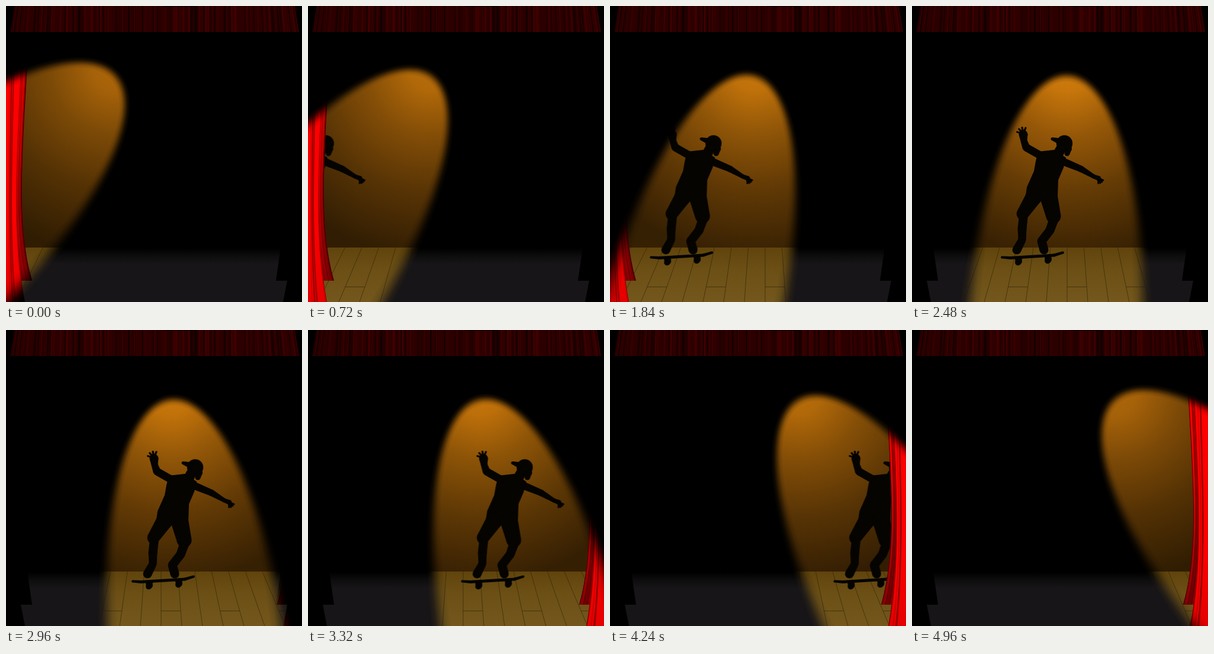
An HTML page with a canvas for the animation above (5000 ms loop, 500x500 px).

```html
<!DOCTYPE html>
<html lang="en">
<head>
<meta charset="utf-8">
<title>Skater in the spotlight</title>
<style>
html, body { margin: 0; width: 100%; height: 100%; overflow: hidden; background: #000; }
canvas { display: block; width: 500px; height: 500px; }
</style>
</head>
<body>
<canvas id="stage" width="500" height="500"></canvas>
<script>
const SIZE = 500, LOOP = 5000, STEP = 40, HORIZON = 408;

let seed = 7;
function rnd() {
  seed = (seed * 16807) % 2147483647;
  return seed / 2147483647;
}

function layer(draw) {
  const c = document.createElement('canvas');
  c.width = c.height = SIZE;
  if (draw) draw(c.getContext('2d'));
  return c;
}

function ramp(g, stops) {
  stops.forEach(([at, color]) => g.addColorStop(at, color));
  return g;
}

function polygon(c, points) {
  c.beginPath();
  points.forEach(([x, y]) => c.lineTo(x, y));
  c.fill();
}

// Chain of tapered capsules through joints [x, y, radius]
function limb(c, ...joints) {
  joints.forEach(([x, y, r], i) => {
    c.beginPath();
    c.arc(x, y, r, 0, 2 * Math.PI);
    c.fill();
    if (!i) return;
    const [px, py, pr] = joints[i - 1];
    const d = Math.hypot(x - px, y - py), nx = (py - y) / d, ny = (x - px) / d;
    polygon(c, [[px + nx * pr, py + ny * pr], [x + nx * r, y + ny * r],
      [x - nx * r, y - ny * r], [px - nx * pr, py - ny * pr]]);
  });
}

function fingers(c, x, y, from, spread, length) {
  for (let i = 0; i < 4; i++) {
    const a = from + spread * i;
    limb(c, [x, y, 2], [x + length * Math.cos(a), y + length * Math.sin(a), 1.5]);
  }
}

const valance = layer(c => {
  const flare = (f, y) => 14 + 474 * f + 7 * (2 * f - 1) ** 5 * y / 44;
  const strand = f => {
    c.moveTo(flare(f, 0), 0);
    c.lineTo(flare(f, 44), 44);
  };
  c.beginPath();
  strand(0);
  c.lineTo(flare(1, 44), 44);
  c.lineTo(flare(1, 0), 0);
  c.clip();
  c.fillStyle = '#2c0000';
  c.fillRect(0, 0, SIZE, 45);
  for (let i = 0; i < 200; i++) {
    c.strokeStyle = rnd() < 0.6 ? `rgba(8,0,0,${0.2 + rnd() * 0.4})` : `rgba(76,0,2,${0.2 + rnd() * 0.4})`;
    c.lineWidth = 1 + rnd() * 2;
    c.beginPath();
    strand(rnd());
    c.stroke();
  }
  c.fillStyle = '#000';
  c.fillRect(265, 0, 55, 1);
});

const dimFloor = layer(c => {
  c.fillStyle = ramp(c.createLinearGradient(0, 409, 0, 436),
    [[0, '#000'], [0.5, '#0e0d0e'], [1, '#171517']]);
  const side = [[36, HORIZON], [44, 464], [25, 464], [32, SIZE]];
  polygon(c, [...side, ...side.map(([x, y]) => [500 - x, y]).reverse()]);
});

const floor = layer(c => {
  c.fillStyle = ramp(c.createLinearGradient(0, HORIZON, 0, SIZE),
    [[0, '#60440c'], [0.4, '#6b4f15'], [1, '#73571c']]);
  c.fillRect(0, HORIZON, SIZE, SIZE - HORIZON);
  c.strokeStyle = 'rgba(48,32,6,.6)';
  const seam = (k, y) => 262 + k * (28.5 + 6.5 * (y - HORIZON) / 92);
  c.beginPath();
  for (let k = -10; k <= 9; k++) {
    c.moveTo(seam(k, HORIZON), HORIZON);
    c.lineTo(seam(k, SIZE), SIZE);
    if ((k + 10) % 3 === 0) {
      c.moveTo(seam(k + 1, 474.5), 474.5);
      c.lineTo(seam(k + 2, 474.5), 474.5);
    }
  }
  c.stroke();
});

const backFold = (c, f) => c.bezierCurveTo(f * 28, 250, f * 17, 370, f * 44, 464);
const frontFold = (c, f) => c.bezierCurveTo(f * 20, 250, f * 10, 380, f * 32, SIZE);

function panel(c, { top, bottom, fold, colors, strands, shade }) {
  c.save();
  c.beginPath();
  c.moveTo(-2, 100);
  c.lineTo(top, 100);
  fold(c, 1);
  c.lineTo(-2, bottom);
  c.clip();
  c.fillStyle = ramp(c.createLinearGradient(0, 100, 0, bottom), colors);
  c.fillRect(-2, 90, 60, 420);
  for (let i = 0; i < strands; i++) {
    const f = 1 - 0.9 * rnd() ** 1.6;
    c.strokeStyle = `rgba(60,0,2,${shade * (0.3 + rnd() * 0.7)})`;
    c.lineWidth = 0.6 + rnd();
    c.beginPath();
    c.moveTo(top * f, 100);
    fold(c, f);
    c.stroke();
  }
  c.restore();
}

function curtain(c) {
  panel(c, {
    top: 36, bottom: 464, fold: backFold, strands: 20, shade: 0.7,
    colors: [[0, '#f00'], [0.4, '#e40000'], [1, '#860004']]
  });
  panel(c, {
    top: 27, bottom: SIZE, fold: frontFold, strands: 10, shade: 0.5,
    colors: [[0, '#f00'], [0.7, '#fc0000'], [1, '#e40000']]
  });
}

const curtains = layer(c => {
  curtain(c);
  c.translate(502, 0);
  c.scale(-1, 1);
  curtain(c);
});

// Drawn around its mid-loop pose, shifted left to start at x = 70
const skater = layer(c => {
  c.translate(-80, 0);
  c.fillStyle = '#050401';
  // head, cap and neck
  limb(c, [257.5, 232, 13.7]);
  limb(c, [248, 228, 5], [237, 224.5, 2.5]);
  limb(c, [266, 241, 4], [262, 249, 4.5]);
  limb(c, [251, 242, 8.5], [245, 253, 9]);
  // torso
  polygon(c, [[213, 246], [240, 243], [260, 256], [256, 273], [247, 294],
    [246, 322], [192, 320], [194, 306], [206, 279], [209, 262]]);
  // arms
  limb(c, [216, 252, 6.5], [193, 239, 6.5], [189, 228, 5.5], [188, 217, 7.5]);
  fingers(c, 188, 216, -2.85, 0.55, 11);
  limb(c, [256, 263, 6.5], [285, 275, 5.5], [307, 288, 3.5], [315, 291, 4]);
  fingers(c, 315, 291, 0.4, 0.4, 8.5);
  // legs
  limb(c, [206, 322, 14], [187, 351, 10.5]);
  limb(c, [188, 358, 7.5], [186, 376, 7.5], [186, 395, 6.5], [177, 412, 7.5]);
  limb(c, [231, 322, 15], [239, 355, 12.5]);
  limb(c, [239, 362, 8], [233, 379, 7.5], [219, 397, 7.5], [223, 412, 7.5]);
  // board
  limb(c, [152, 424.5, 2], [166, 425.5, 2.5], [240, 421, 2.5], [255, 416.5, 2]);
  for (const [x, y] of [[179, 433.5], [229, 430.5]]) {
    limb(c, [x - 3, y - 6, 2], [x, y, 4.8], [x + 2, y - 2, 4.8], [x + 5, y - 8, 2]);
  }
});

const lit = layer(), light = lit.getContext('2d');
const stage = document.getElementById('stage').getContext('2d');

// Keeps only what lies inside a tilted, soft-edged ellipse
function maskBeam(c, x, u) {
  const length = 507, width = 167 + 12 * u * u;
  c.save();
  c.globalCompositeOperation = 'destination-in';
  c.translate(x, 115);
  c.rotate((2.5 - 45 * u) * Math.PI / 180);
  c.translate(0, length - 7);
  c.scale(width, length);
  c.fillStyle = ramp(c.createRadialGradient(0, -0.2, 0.76, 0, 0, 1), [
    [0, 'rgba(0,0,0,1)'], [0.25, 'rgba(0,0,0,.85)'], [0.5, 'rgba(0,0,0,.5)'],
    [0.75, 'rgba(0,0,0,.15)'], [1, 'rgba(0,0,0,0)']
  ]);
  c.fillRect(-20, -20, 40, 40);
  c.restore();
}

function render(t) {
  const u = (t - LOOP / 2) / (LOOP / 2);
  const x = 264 + 78 * u;
  const dim = 1 - 0.17 * Math.abs(u);
  const tone = k => `rgb(${208 * k * dim},${123 * k * dim},${11 * k * dim})`;

  light.globalCompositeOperation = 'source-over';
  light.clearRect(0, 0, SIZE, SIZE);
  light.fillStyle = ramp(light.createRadialGradient(x, 105, 0, x, 105, 320),
    [[0, tone(1)], [0.12, tone(0.96)], [0.35, tone(0.72)], [0.65, tone(0.48)], [1, tone(0.27)]]);
  light.fillRect(0, 0, SIZE, SIZE);
  light.drawImage(floor, 0, 0);
  light.drawImage(skater, 80 + 0.1292 * (t - 2480), 0);
  light.drawImage(curtains, 0, 0);
  maskBeam(light, x, u);

  stage.fillStyle = '#000';
  stage.fillRect(0, 0, SIZE, SIZE);
  stage.drawImage(dimFloor, 0, 0);
  stage.drawImage(lit, 0, 0);
  stage.drawImage(valance, 0, 0);
}

const start = performance.now();
function tick() {
  const t = (performance.now() - start) % LOOP;
  render(Math.floor(t / STEP) * STEP);
  requestAnimationFrame(tick);
}
tick();
</script>
</body>
</html>
```
